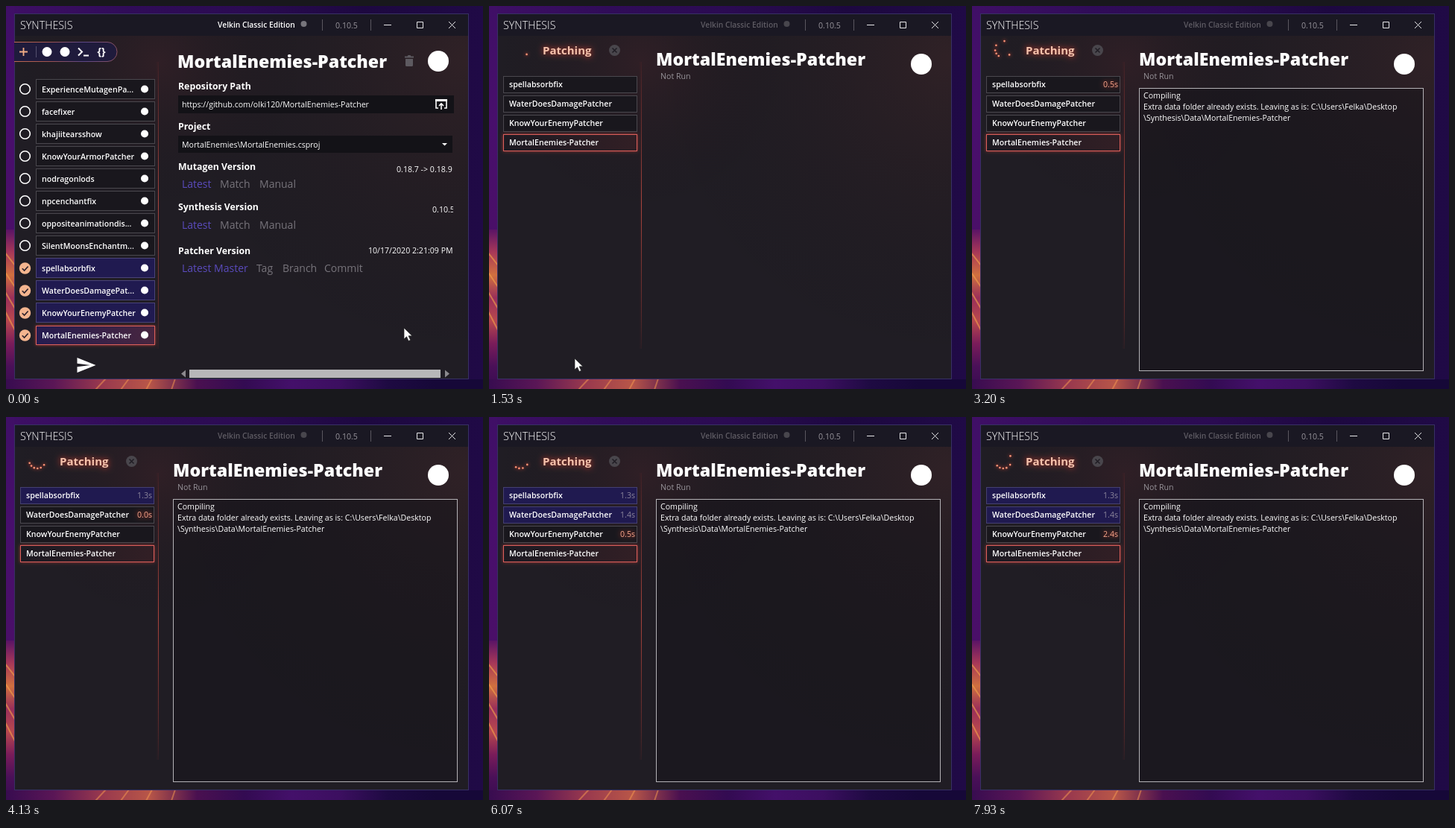
Animation of 640 by 514 pixels, one loop 8000 ms. Source, as an HTML page with a canvas:

```html
<!DOCTYPE html>
<html lang="en">
<head>
<meta charset="utf-8">
<title>Synthesis</title>
<style>
html, body { margin: 0; height: 100%; overflow: hidden; background: #260c4c; }
canvas { display: block; width: 640px; height: 514px; }
</style>
</head>
<body>
<canvas width="640" height="514"></canvas>
<script>
const LOOP = 8000, RUN_VIEW = 1400;
const g = document.querySelector('canvas').getContext('2d');
const TAU = Math.PI * 2;
const SEMI = '600 10.6px', BODY = '400 10.6px', HEAD = '700 12.3px', OPTION = '400 14px';

const patchers = ['ExperienceMutagenPa...', 'facefixer', 'khajiitearsshow', 'KnowYourArmorPatcher',
  'nodragonlods', 'npcenchantfix', 'oppositeanimationdis...', 'SilentMoonsEnchantm...',
  'spellabsorbfix', 'WaterDoesDamagePat...', 'KnowYourEnemyPatcher', 'MortalEnemies-Patcher'];

// name, start and end of each run
const runs = [
  ['spellabsorbfix', 2680, 4000],
  ['WaterDoesDamagePatcher', 4050, 5500],
  ['KnowYourEnemyPatcher', 5500, Infinity],
  ['MortalEnemies-Patcher', Infinity, Infinity]
];

// time (s), angle, easing spline
const spin = [[0, -110], [.433, 10, .02, .33, .38, .77], [1.2, 93, 0, 0, 1, 1],
  [1.617, 205, .57, .17, .95, .75], [2.017, 357, 0, .19, .07, .72],
  [2.783, 439, 0, 0, 1, 1], [3.217, 585, 0, 0, .95, .37]];

const clamp = v => Math.max(0, Math.min(1, v));
const smooth = v => v * v * (3 - 2 * v);

function spline(x, x1, y1, x2, y2) {
  const at = (s, a, b) => 3 * (1 - s) * (1 - s) * s * a + 3 * (1 - s) * s * s * b + s ** 3;
  let lo = 0, hi = 1;
  for (let i = 0; i < 24; i++) {
    const mid = (lo + hi) / 2;
    if (at(mid, x1, x2) < x) lo = mid; else hi = mid;
  }
  return at(lo, y1, y2);
}

function text(str, x, y, font, color = '#fff', align = 'left') {
  g.font = font + ' "Open Sans", sans-serif';
  g.fillStyle = color;
  g.textAlign = align;
  g.fillText(str, x, y);
}

function rect(x, y, w, h, fill, stroke) {
  if (fill) { g.fillStyle = fill; g.fillRect(x, y, w, h); }
  if (stroke) { g.strokeStyle = stroke; g.lineWidth = 1; g.strokeRect(x + .5, y + .5, w - 1, h - 1); }
}

function disc(x, y, r, fill) {
  g.beginPath();
  g.arc(x, y, r, 0, TAU);
  g.fillStyle = fill;
  g.fill();
}

function path(d, { x = 0, y = 0, fill, stroke, width = 1 }) {
  const p = new Path2D(d);
  g.save();
  g.translate(x, y);
  if (fill) { g.fillStyle = fill; g.fill(p); }
  if (stroke) { g.strokeStyle = stroke; g.lineWidth = width; g.stroke(p); }
  g.restore();
}

function glow(color, blur, draw) {
  g.save();
  g.shadowColor = color;
  g.shadowBlur = blur;
  draw();
  g.restore();
}

function gradient(x0, y0, x1, y1, ...colors) {
  const grad = g.createLinearGradient(x0, y0, x1, y1);
  colors.forEach((c, i) => grad.addColorStop(i / (colors.length - 1), c));
  return grad;
}

function tint(x, y, r, color) {
  const grad = g.createRadialGradient(x, y, 0, x, y, r);
  grad.addColorStop(0, color);
  grad.addColorStop(1, 'rgba(0,0,0,0)');
  g.fillStyle = grad;
  g.fillRect(11, 40, 609, 460);
}

function desktop() {
  rect(0, 0, 640, 514, gradient(0, 0, 640, 0, '#3f0f66', '#300c58', '#2b0b52', '#1d0840', '#200a46'));
  rect(0, 0, 11, 300, gradient(0, 0, 0, 300, '#3f0f66', '#480f6c', '#4a0f68'));
  rect(0, 300, 11, 214, gradient(0, 300, 0, 514,
    '#5a1466', '#a83858', '#d0703f', '#9a2f5a', '#b8484e', '#7a1c5a', '#4a1058', '#380c50'));
  rect(0, 501, 640, 13, gradient(0, 0, 640, 0,
    '#380c50', '#5a1656', '#98384e', '#b85648', '#4a1050', '#330b52', '#44106a', '#3c0f60', '#1e0a42', '#160838', '#160838'));
  for (let i = 0; i < 4; i++) {
    path(`M-2 ${330 + i * 26}l14 ${18 + i * 3}`, { stroke: 'rgba(245,165,75,.6)', width: 2 });
    path(`M${120 + i * 34} 515l${14 - i * 3} -15`, { stroke: 'rgba(240,150,80,.55)', width: 2 });
  }
}

function windowFrame(running) {
  rect(11, 10, 610, 491, '#201d24', '#383064');
  tint(620, 70, 420, 'rgba(130,55,50,.16)');
  tint(205, 75, 210, 'rgba(150,45,50,.13)');
  rect(12, 11, 608, 29, '#1a1823');
  text('SYNTHESIS', 19, 31, '300 14.3px');
  text('Velkin Classic Edition', 284, 29, '600 10.3px', running ? '#5f5c64' : '#fff');
  disc(399.5, 24, 4, running ? '#48464d' : '#77757c');
  rect(424, 18, 1, 15, '#5a5760');
  rect(489, 18, 1, 15, '#5a5760');
  text('0.10.5', 442, 30, BODY, '#98959c');
  path('M507 25.5h10M551.5 21.5h8v8h-8zM594 21l9 9m0-9l-9 9', { stroke: '#e8e8ea' });

  rect(201, 75, 4, 385, gradient(201, 0, 205, 0, 'rgba(190,50,45,0)', 'rgba(190,50,45,.08)'));
  rect(204, 75, 1, 385, gradient(0, 75, 0, 460, 'rgba(150,55,50,0)', '#6e302f', '#a8443d', '#6e302f', 'rgba(150,55,50,0)'));
}

function title(x, y, iconY) {
  text('MortalEnemies-Patcher', x, y, '800 23.2px');
  disc(580, iconY, 14, '#fff');
}

function selectedBox(x, y, w, h, fill) {
  glow('rgba(216,69,60,.7)', 4, () => rect(x, y, w, h, '#1d1a24'));
  rect(x, y, w, h, fill, '#dc605c');
}

function toolbar() {
  path('M11 48.5H136a12.5 12.5 0 0 1 0 26H11', {
    fill: '#1f1b3c', stroke: gradient(11, 0, 150, 0, '#c06a52', '#a0544f', '#5b4788', '#8a5260')
  });
  path('M18 61.5h11M23.5 56v11', { stroke: '#f3ad85', width: 1.8 });
  rect(40, 54, 1, 15, '#55506e');
  disc(55, 61.5, 6.5, '#fff');
  disc(79, 61.5, 6.5, '#fff');
  path('M97 56.5l5 5-5 5M104 66.5h7', { stroke: '#fff', width: 2 });
  text('{}', 128, 66, '700 14px', '#fff', 'center');
}

function patcherList() {
  patchers.forEach((name, i) => {
    const y = 98 + i * 30, on = i > 7;
    if (i === patchers.length - 1) selectedBox(40, y + 1, 160, 26, gradient(40, 0, 200, 0, '#251c50', '#48263f'));
    else rect(40, y, 160, 27, on ? '#201a50' : '#19171d', on ? '#4a4378' : '#4a484e');
    text(name, 48, y + 18, SEMI);
    disc(186, y + 13.5, 5, '#fff');
    if (on) {
      disc(25.5, y + 14, 7.7, '#f4b58f');
      path('M21.8 14.2l2.8 2.8 5-5.5', { y, stroke: '#2a1f2a', width: 1.6 });
    } else {
      g.beginPath();
      g.arc(25.5, y + 13.5, 6.8, 0, TAU);
      g.lineWidth = 1.6;
      g.strokeStyle = '#fff';
      g.stroke();
    }
  });
}

function options(y, labels) {
  labels.forEach(([label, x], i) => text(label, x, y, OPTION, i ? '#77747b' : '#5a4bbd'));
}

function settingsView(hover) {
  toolbar();
  patcherList();
  path('M0 20L25 10 0 0V7.8L17.5 10 0 12.2z', { x: 95.5, y: 472, fill: hover ? '#55c4ec' : '#fff' });
  if (hover) text('Run', 59, 486, HEAD, '#6cc6f2');

  title(230, 83, 74);
  path('M535 67.5h3.5l1-1.5h3l1 1.5H547v2H535zM536 71h10v8.5q0 1.5-1.5 1.5h-7q-1.5 0-1.5-1.5z', { fill: '#5d5a60' });

  text('Repository Path', 231, 112, HEAD);
  rect(231, 120, 370, 24, '#131217');
  text('https://github.com/olki120/MortalEnemies-Patcher', 236, 136, BODY);
  path('M580 137h-3v-10h14v10h-3M584 139v-8m-3 3l3-3 3 3', { stroke: '#fff', width: 1.6 });
  rect(576, 125, 16, 3, '#fff');

  text('Project', 231, 166, HEAD);
  rect(231, 174, 368, 23, '#131217');
  text('MortalEnemies\\MortalEnemies.csproj', 236, 190, BODY);
  path('M585 184h7l-3.5 3.5z', { fill: '#fff' });

  text('Mutagen Version', 231, 219.5, HEAD);
  text('Synthesis Version', 231, 274, HEAD);
  text('Patcher Version', 231, 332.5, HEAD);
  const versions = [['Latest', 236], ['Match', 287], ['Manual', 340]];
  options(244, versions);
  options(298.5, versions);
  options(357, [['Latest Master', 236], ['Tag', 336], ['Branch', 371], ['Commit', 427]]);

  g.save();
  g.beginPath();
  g.rect(400, 200, 200, 150);
  g.clip();
  text('0.18.7 -> 0.18.9', 524, 223, BODY);
  text('0.10.5', 572, 277, BODY);
  text('10/17/2020 2:21:09 PM', 486, 332, BODY);
  g.restore();

  rect(246, 488, 337, 11, '#b7b7b9');
  path('M241 488.5v10l-6-5zM589 488.5v10l6-5z', { fill: '#8b898e' });
}

function spinner(t) {
  const cycle = (t - 1430) / 1000 % 4;
  for (let i = 0; i < 6; i++) {
    const s = cycle - i * .167;
    const k = spin.findIndex(key => key[0] > s);
    if (s < 0 || k < 1) continue;
    const [t0, a0] = spin[k - 1], [t1, a1, ...curve] = spin[k];
    const a = (a0 + (a1 - a0) * spline((s - t0) / (t1 - t0), ...curve) - i * 6) * TAU / 360;
    glow('#ff4a30', 4, () => disc(42 - 11 * Math.sin(a), 58 + 11 * Math.cos(a), 1.3, '#ff9678'));
  }
}

function runView(t) {
  spinner(t);
  glow('#e0402c', 8, () => text('Patching', 72, 64.5, '700 15px', '#f7c3ad'));
  disc(168.5, 59.5, 7.5, '#49464c');
  path('M165.5 56.5l6 6m0-6l-6 6', { stroke: '#211e25', width: 1.6 });

  runs.forEach(([name, start, end], i) => {
    const y = Math.round(93.5 + i * 26.3), done = t >= end;
    if (i === 3) selectedBox(19, y, 180, 23, gradient(19, 0, 199, 0, '#1d1a22', '#321f25'));
    else rect(19, y, 180, 23, done ? '#201a50' : '#19171d', done ? '#454070' : '#4a484e');
    text(name, 27, y + 15, SEMI);
    if (t < start) return;
    const seconds = (Math.floor((Math.min(t, end) - start) / 100) / 10).toFixed(1) + 's';
    if (done) text(seconds, 196, y + 15, BODY, '#8d879c', 'right');
    else glow('#e0402c', 6, () => text(seconds, 196, y + 15, BODY, '#f9a68c', 'right'));
  });

  title(224, 80, 78);
  text('Not Run', 230, 98, BODY, '#98949a');
  if (t < 1800) return;
  rect(224, 110, 382, 380, 'rgba(22,20,26,.5)', '#b4b2b6');
  if (t < 2000) return;
  ['Compiling',
    'Extra data folder already exists. Leaving as is: C:\\Users\\Felka\\Desktop',
    '\\Synthesis\\Data\\MortalEnemies-Patcher'
  ].forEach((line, i) => text(line, 230, 123.5 + i * 15, BODY));
}

function cursorAt(t) {
  const go = smooth(clamp((t - 70) / 640));
  const nudge = clamp((t - 1000) / 200);
  const leave = smooth(clamp((t - 1600) / 400));
  return [534 - 416 * go - 3 * nudge - 20 * leave, 432 + 42 * go - nudge + 45 * leave];
}

function draw(t) {
  const running = t >= RUN_VIEW;
  const [x, y] = cursorAt(t);
  desktop();
  windowFrame(running);
  if (running) runView(t); else settingsView(x < 135);
  path('M0 0V15l3.5-3.2 2.6 5.7 2.6-1.2-2.6-5.5H11z', { x, y, fill: '#fff', stroke: '#222', width: .7 });
}

function frame() {
  draw(performance.now() % LOOP);
  requestAnimationFrame(frame);
}
frame();
</script>
</body>
</html>
```
